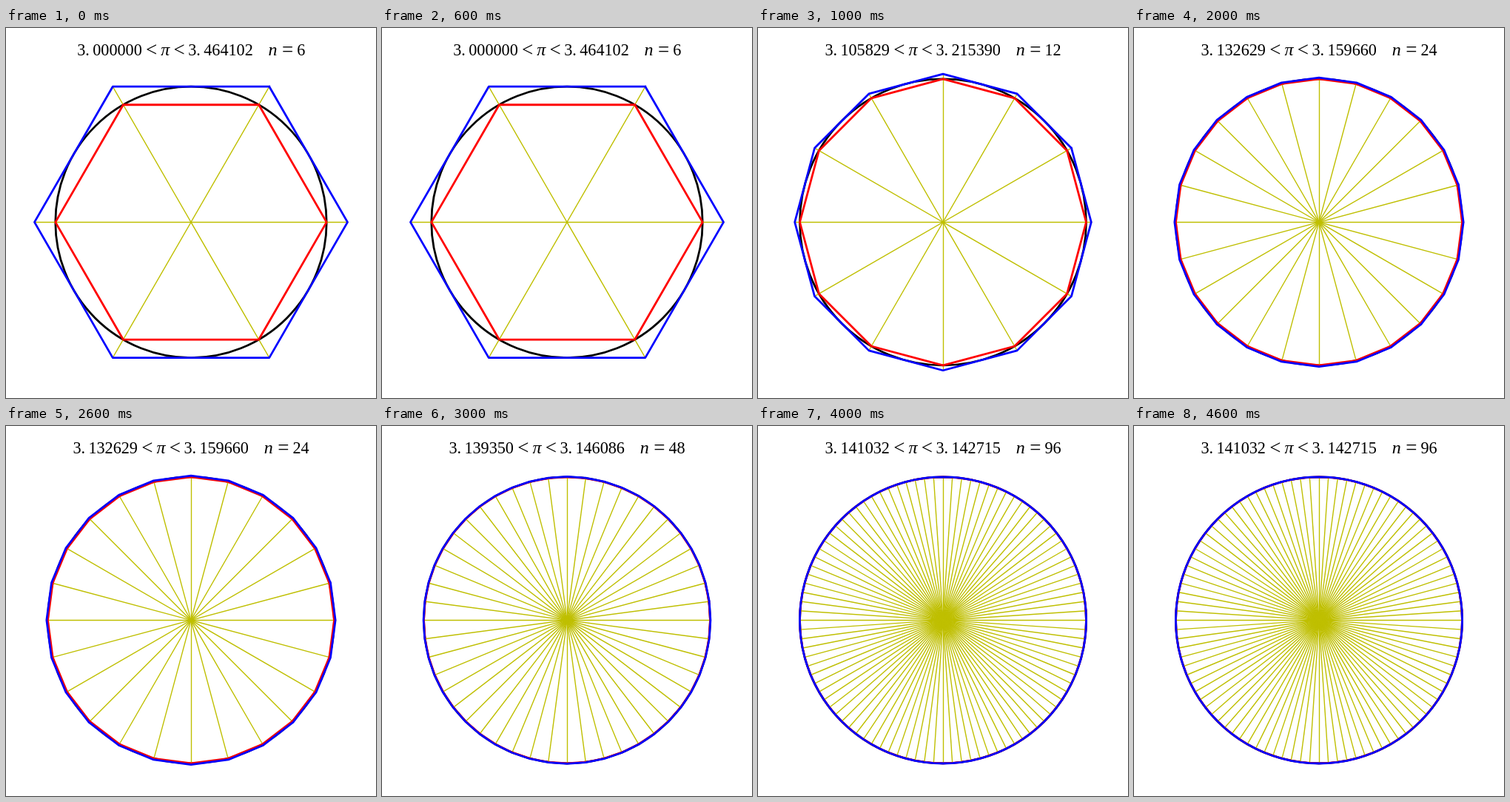
An HTML page with a canvas that plays this animation: 500 by 500 pixels, repeating every 5000 ms.

```html
<!DOCTYPE html>
<html lang="en">
<head>
<meta charset="utf-8">
<title>Bounding pi with polygons</title>
<style>
html, body { margin: 0; width: 100%; height: 100%; overflow: hidden; background: #fff; }
canvas { display: block; }
</style>
</head>
<body>
<canvas id="stage" width="500" height="500"></canvas>
<script>
const ctx = document.getElementById('stage').getContext('2d');
const CX = 250, CY = 262.4, TAU = 2 * Math.PI;

function stroke(color, width) {
  ctx.strokeStyle = color;
  ctx.lineWidth = width;
  ctx.stroke();
}

function polygon(n, radius, color) {
  ctx.beginPath();
  // Starts one step round and is left open, so square caps meet at that corner.
  for (let k = 1; k <= n + 1; k++) {
    const a = k * TAU / n;
    ctx.lineTo(CX + radius * Math.cos(a), CY - radius * Math.sin(a));
  }
  stroke(color, 2.78);
}

function spokes(n, radius) {
  for (let k = 0; k < n; k++) {
    const a = k * TAU / n;
    const snap = k % (n / 4) === 0;
    const x = snap ? CX + 0.5 : CX, y = snap ? 262.5 : CY;
    ctx.beginPath();
    ctx.moveTo(x, y);
    ctx.lineTo(x + radius * Math.cos(a), y - radius * Math.sin(a));
    stroke('#bfbf00', 1.39);
  }
}

function write(text, x, { style = '', size = 22.2, align = 'left', y = 36.6 } = {}) {
  ctx.font = `${style} ${size}px "Liberation Serif", "Times New Roman", serif`;
  ctx.textAlign = align;
  ctx.fillText(text, x, y);
}

function decimal(value, x) {
  const [whole, fraction] = value.toFixed(6).split('.');
  write(whole + '.', x);
  write(fraction, x + 21);
}

function title(n) {
  const x = n < 10 ? 96.2 : 90.4;
  const sign = { size: 27, align: 'center', y: 38 };
  const letter = { style: 'italic', size: 24, align: 'center' };
  ctx.fillStyle = '#000';
  decimal(n * Math.sin(Math.PI / n), x);
  write('<', x + 100.5, sign);
  write('π', x + 119, letter);
  write('<', x + 138, sign);
  decimal(n * Math.tan(Math.PI / n), x + 150);
  write('n', x + 264.3, letter);
  write('=', x + 284.5, sign);
  write(n, x + 297);
}

function draw(n) {
  const r = n === 6 ? 183.2 : 193.5;
  const outer = r / Math.cos(Math.PI / n);
  ctx.fillStyle = '#fff';
  ctx.fillRect(0, 0, 500, 500);
  ctx.lineCap = 'square';
  ctx.lineJoin = 'round';
  ctx.beginPath();
  ctx.arc(CX, CY, r, 0, TAU);
  stroke('#000', 2.78);
  spokes(n, outer);
  polygon(n, r, '#f00');
  polygon(n, outer, '#00f');
  title(n);
}

const start = performance.now();
let shown = -1;
function tick() {
  const step = Math.floor((performance.now() - start) / 1000) % 5;
  if (step !== shown) draw(6 * 2 ** (shown = step));
  requestAnimationFrame(tick);
}
tick();
</script>
</body>
</html>
```
